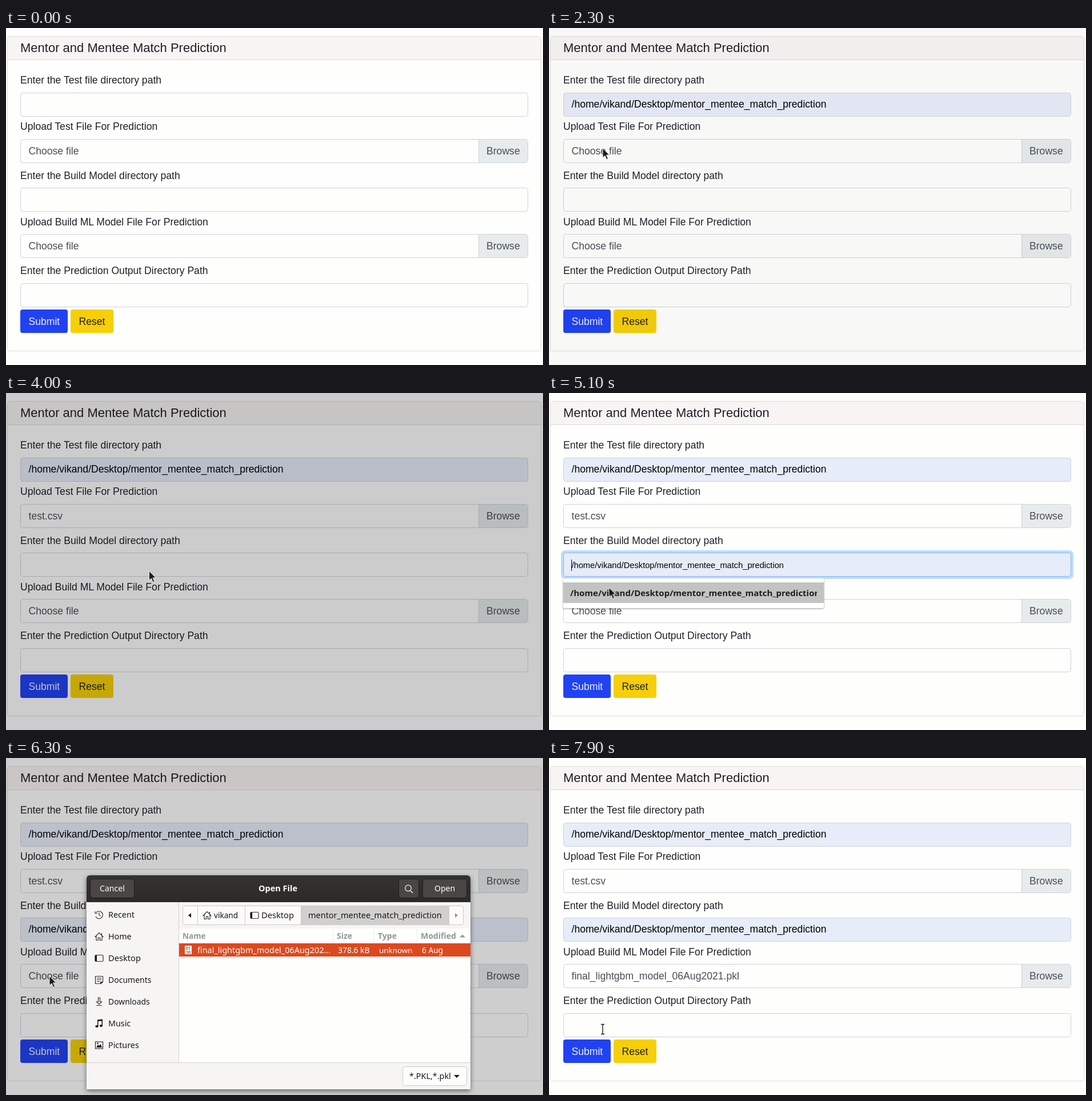
Write an HTML page that moves like this. It is 940 by 589 pixels and loops after 8000 ms.

```html
<!DOCTYPE html>
<html lang="en">
<head>
<meta charset="utf-8">
<title>Match prediction form</title>
<style>
  html, body { margin: 0; width: 100%; height: 100%; overflow: hidden; background: #fefefd; }
  svg { display: block; width: 940px; height: 589px; }
  text { white-space: pre; }
  .form { font: 17.6px "Liberation Sans", Arial, sans-serif; fill: #1d2027; }
  .form .soft { fill: #494f57; }
  .form .path { fill: #000; }
  .dlg, .popup { font: 14.3px "Noto Sans", "Open Sans", sans-serif; fill: #17191a; }
  .bold { font-weight: 700; }
  .head { font-weight: 700; font-size: 14px; fill: #939798; }
  .light { fill: #fff; }
  .line { fill: none; stroke: #2b2f31; stroke-width: 1.2; }
</style>
</head>
<body>
<svg id="stage" viewBox="0 0 940 589" xmlns="http://www.w3.org/2000/svg"></svg>
<script>
const LOOP = 8000, STEP = 100;
const USER = 'vikand';
const FOLDER = 'mentor_mentee_match_prediction';
const PATH = `/home/${USER}/Desktop/${FOLDER}`;

const label = (x, y, str, attrs = '') => `<text x="${x}" y="${y}" ${attrs}>${str}</text>`;
const size = px => `style="font-size:${px}px"`;
const rect = (x, y, w, h, fill, attrs = '') =>
  `<rect x="${x}" y="${y}" width="${w}" height="${h}" fill="${fill}" ${attrs}/>`;
// crisp one-pixel border covering x..x+w
const box = (x, y, w, h, fill, border, r = 4, attrs = '') =>
  rect(x + .5, y + .5, w - 1, h - 1, fill, `rx="${r}" stroke="${border}" ${attrs}`);
const vline = (x, y1, y2, color) => rect(x, y1, 1, y2 - y1, color);

// ---- page form ----
const textField = (id, y) => `
  <g id="${id}Focus">${rect(21, y - 4, 897, 50, '#bfdcfa', 'rx="7"')}</g>
  ${box(25, y, 889, 42, '#fefefd', '#ced4d8', 4, `id="${id}Box"`)}
  ${label(39.5, y + 26, PATH, `id="${id}Text" class="path"`)}
  <g id="${id}Preview">${label(39.5, y + 27, PATH, `class="path" ${size(14.67)}`)}</g>
  <g id="${id}Caret">${vline(39, y + 12, y + 32, '#000')}</g>`;

const fileField = (id, y) => `
  ${box(25, y, 889, 42, '#fefefd', '#ced4d8')}
  <path d="M828 ${y + 1}h82q3 0 3 3v34q0 3-3 3h-82z" fill="#e7ebec"/>
  ${vline(827, y + 1, y + 41, '#ced4d8')}
  ${label(39.5, y + 27, 'Choose file', `id="${id}" class="soft"`)}
  ${label(841, y + 27, 'Browse', 'class="soft"')}`;

const popup = (id, y) => `
  <g id="${id}Popup" class="popup">
    ${rect(25, y, 456, 52, '#fff', 'rx="2" filter="url(#popShadow)"')}
    <g id="${id}Hover">${rect(25, y + 7, 456, 36, '#c3c3c2')}</g>
    <svg x="25" y="${y}" width="444" height="52">${label(12, 31, PATH, `class="bold" fill="#1b1e20" ${size(15)}`)}</svg>
  </g>`;

const form = `
  <g class="form">
    ${box(2, 14, 935, 551, '#fefefd', '#dddddc')}
    <path d="M3 55V18q0-3 3-3h927q3 0 3 3v37z" fill="#f7f4f3"/>
    ${rect(3, 55, 933, 1, '#d9d9d9')}
    ${label(25, 42, 'Mentor and Mentee Match Prediction', size(22))}
    ${label(25, 97, 'Enter the Test file directory path')}
    ${textField('test', 113)}
    ${label(25, 178, 'Upload Test File For Prediction')}
    ${fileField('testFile', 194)}
    ${label(25, 264, 'Enter the Build Model directory path')}
    ${textField('model', 279)}
    ${label(25, 345, 'Upload Build ML Model File For Prediction')}
    ${fileField('modelFile', 360)}
    ${label(25, 430, 'Enter the Prediction Output Directory Path')}
    ${box(25, 446, 889, 42, '#fefefd', '#ced4d8')}
    ${rect(25, 492, 83, 41, '#2142f3', 'rx="4"')}
    ${label(39.5, 519, 'Submit', 'fill="#eef3fc"')}
    ${rect(113, 492, 75, 41, '#f6cf08', 'rx="4"')}
    ${label(127.5, 519, 'Reset')}
  </g>
  ${popup('test', 158)}
  ${popup('model', 324)}`;

// ---- file dialog ----
const ICONS = {
  Recent: '<path class="line" d="M-5-4A6.5 6.5 0 1 1-6 3M-7-6v3.5h3.5M0-4v4.5l3 1.5"/>',
  Home: '<path class="line" d="M-7.5 1L0-6.5 7.5 1M-5-1v7.5h3.5V2h3v4.5H5V-1M4.5-6v3"/>',
  Desktop: '<rect class="line" x="-7" y="-5.5" width="14" height="11" rx="1.5"/><path d="M-7-5h3V5h-3z"/>',
  Documents: '<path class="line" d="M-6.5-6.5h13v10l-3 3h-10zM-4-3.5h8M-4-.5h8M-4 2.5h5"/><path d="M2 6.5V3h4.5z"/>',
  Downloads: '<path class="line" d="M-1.5-7v7h-3L0 4.5 4.5 0h-3v-7zM-5 6.5H5"/>',
  Music: '<path d="M-3-6.5L6-7.5V4h-1.5v-8.5L-1.5-4V5H-3z"/><ellipse cx="-4" cy="5" rx="2.7" ry="2"/><ellipse cx="3.5" cy="4" rx="2.7" ry="2"/>',
  Pictures: '<rect class="line" x="-6.5" y="-6" width="13" height="12"/><path d="M-5 4L-2-1 0 1 2.5-2 5 4z"/><circle cx="-2.5" cy="-3" r="1.3"/>'
};
const icon = (name, x, y) => `<g transform="translate(${x} ${y})">${ICONS[name]}</g>`;
const placeSize = { Desktop: 14.66, Downloads: 13.9, Documents: 14 };
const places = Object.keys(ICONS).map((name, i) =>
  icon(name, 163, 274 + 38 * i) +
  label(179, 279 + 38 * i, name, size(placeSize[name] || 14.3))).join('');

const listing = (id, f) => `
  <g id="${id}">
    ${[f.sizeX - 7, f.typeX - 7].map(x => vline(x, 299, 323, '#ececeb')).join('')}
    ${label(f.sizeX, 316, 'Size', 'class="head"')}
    ${label(f.typeX, 316, 'Type', 'class="head"')}
    ${rect(303, 324, 510, 23, '#dc491f')}
    ${rect(313, 328, 12, 15, '#f8f4f1', 'rx="1"')}
    ${f.icon}
    <g class="light">
      ${label(335, 341, f.name, size(f.nameSize))}
      ${label(f.sizeX + 2, 341, f.bytes, size(13.9))}
      ${label(f.typeX + 2, 341, f.kind, size(13.4))}
      ${label(728, 341, f.date, size(13.7))}
    </g>
    ${box(f.filterX, 539, 807 - f.filterX, 34, '#fdfdfc', '#cdc8c3', 4)}
    ${label(f.filterX + 12, 561, f.filter, size(f.filterSize))}
    <path d="M784 554h10l-5 5z"/>
  </g>`;

const csv = listing('csvList', {
  sizeX: 618, typeX: 679, name: 'test.csv', nameSize: 14.7, bytes: '3.0 MB', kind: 'Text', date: '5 Aug',
  icon: '<path d="M315 332h8M315 335h8M315 338h5" stroke="#6a6260"/>',
  filterX: 695, filter: '*.CSV,*.csv', filterSize: 14
});
const pkl = listing('pklList', {
  sizeX: 579, typeX: 651, name: 'final_lightgbm_model_06Aug202...', nameSize: 14.43,
  bytes: '378.6 kB', kind: 'unknown', date: '6 Aug',
  icon: label(315, 335, '01', size(7)) + label(315, 342, '10', size(7)),
  filterX: 694, filter: '*.PKL,*.pkl', filterSize: 14.4
});

const dialog = `
  <g id="dialog" class="dlg">
    <path d="M141 579V211q0-6 6-6h660q6 0 6 6v368z" fill="#f7f5f4" filter="url(#dlgShadow)"/>
    <path d="M141 252V211q0-6 6-6h660q6 0 6 6v41z" fill="url(#bar)"/>
    ${box(147, 211, 78, 34, '#4a4645', '#1f1c1b', 5)}
    ${box(687, 211, 36, 34, '#4a4645', '#1f1c1b', 5)}
    ${box(729, 211, 78, 34, '#4a4645', '#1f1c1b', 5, 'id="openBtn"')}
    <g class="light">
      ${label(164, 233, 'Cancel', size(14.1))}
      ${label(442, 233, 'Open File', `class="bold" ${size(14.5)}`)}
      ${label(750, 233, 'Open', size(14))}
    </g>
    <path d="M708 232l4 4" stroke="#eee" stroke-width="1.6"/>
    <circle cx="704" cy="227.5" r="5.3" fill="none" stroke="#eee" stroke-width="1.2"/>
    ${vline(302, 252, 532, '#d4d0cc')}
    ${places}
    <g id="scroll">${rect(298, 255, 3, 214, '#a3a2a0', 'rx="1.5"')}</g>
    ${box(309, 258, 492, 34, '#fcfbfa', '#cdc8c3', 4)}
    ${rect(517, 259, 258, 32, '#d1d0cf')}
    ${[335, 418, 516, 775].map(x => vline(x, 259, 291, '#cdc8c3')).join('')}
    <path d="M324 271v8l-5-4z"/><path d="M786 271v8l5-4z" fill="#8e9192"/>
    ${icon('Home', 352, 275)}${label(364, 280, USER, size(13.6))}
    ${icon('Desktop', 435, 275)}${label(447, 280, 'Desktop', size(14.66))}
    ${label(529, 280, FOLDER, size(14.48))}
    ${rect(303, 298, 510, 234, '#fefefd')}
    ${rect(303, 323, 510, 1, '#ececeb')}
    ${vline(719, 299, 323, '#ececeb')}
    ${label(309, 316, 'Name', 'class="head" style="font-size:13.5px"')}
    ${label(726, 316, 'Modified', 'class="head"')}
    <path d="M794 313.5h10l-5-5z" fill="#939798"/>
    ${rect(141, 532, 672, 1, '#d4d0cc')}
    ${csv}${pkl}
  </g>`;

const cursor = `
  <path id="arrow" d="M0 0V16.5L3.8 13 6.8 19.6 9.4 18.4 6.5 12H11.6Z" fill="#1b1b1d" stroke="#f4f4f2" stroke-width=".9"/>
  <path id="ibeam" d="M-3-8.5H-1L0-7.5 1-8.5H3M0-7.5V7.5M-3 8.5H-1L0 7.5 1 8.5H3" fill="none" stroke="#111" stroke-width="1.3"/>`;

const stage = document.getElementById('stage');
stage.innerHTML = `
  <defs>
    <linearGradient id="bar" x2="0" y2="1"><stop stop-color="#363231"/><stop offset="1" stop-color="#2c2928"/></linearGradient>
    <filter id="popShadow" x="-5%" y="-20%" width="110%" height="150%"><feDropShadow dx="0" dy="1" stdDeviation="1.8" flood-opacity=".4"/></filter>
    <filter id="dlgShadow" x="-5%" y="-8%" width="110%" height="116%"><feDropShadow dx="0" dy="3" stdDeviation="4.5" flood-opacity=".5"/></filter>
  </defs>
  ${rect(0, 0, 940, 589, '#fefefd')}${form}
  ${rect(0, 0, 940, 589, '#000', 'id="shade"')}${dialog}${cursor}`;

// ---- timeline ----
const el = {};
stage.querySelectorAll('[id]').forEach(n => el[n.id] = n);
const show = (id, on) => el[id].style.display = on ? '' : 'none';

const fields = [
  { id: 'test', focus: 1100, popup: 1300, hover: 1500, pick: 1700, blur: 2200 },
  { id: 'model', focus: 4600, popup: 4700, hover: 5100, pick: 5300, blur: 5800 }
];
const dialogs = [
  { list: 'csvList', file: 'testFile', value: 'test.csv', open: 2300, press: 3600, close: 3900 },
  { list: 'pklList', file: 'modelFile', value: 'final_lightgbm_model_06Aug2021.pkl', open: 5900, press: 7200, close: 7400 }
];
// time, x, y, shape
const moves = [
  [300, 132, 23, 'arrow'], [600, 106, 95, 'arrow'], [700, 94, 118, 'ibeam'], [900, 74, 150, 'ibeam'],
  [1400, 74, 150, 'ibeam'], [1500, 96, 172, 'arrow'], [1700, 100, 178, 'arrow'], [2200, 94, 210, 'arrow'],
  [2800, 94, 210, 'arrow'], [3200, 749, 306, 'arrow'], [3300, 311, 331, 'arrow'], [3400, 331, 328, 'arrow'],
  [3800, 331, 328, 'arrow'], [4200, 170, 294, 'ibeam'], [4400, 135, 286, 'ibeam'], [4800, 135, 286, 'ibeam'],
  [4900, 138, 293, 'ibeam'], [5000, 138, 293, 'ibeam'], [5100, 105, 340, 'arrow'], [5300, 103, 346, 'arrow'],
  [5600, 78, 373, 'arrow'], [5700, 78, 373, 'arrow'], [5800, 76, 381, 'arrow'], [6300, 76, 381, 'arrow'],
  [6600, 397, 334, 'arrow'], [6700, 383, 333, 'arrow'], [6800, 392, 337, 'arrow'], [6900, 392, 337, 'arrow'],
  [7000, 386, 331, 'arrow'], [7300, 386, 331, 'arrow'], [7400, 382.5, 338.5, 'arrow'],
  [7800, 140, 452, 'ibeam'], [7900, 94, 474, 'ibeam']
];

function drawField(f, t) {
  const within = (a, b) => t >= a && t < b;
  const focused = within(f.focus, f.blur), preview = within(f.hover, f.pick), filled = t >= f.pick;
  show(f.id + 'Focus', focused);
  el[f.id + 'Focus'].setAttribute('opacity', Math.min(1, (t - f.focus + 50) / 150));
  show(f.id + 'Caret', within(f.focus, f.pick));
  show(f.id + 'Preview', preview);
  show(f.id + 'Text', filled);
  show(f.id + 'Popup', within(f.popup, f.pick));
  show(f.id + 'Hover', preview);
  el[f.id + 'Box'].setAttribute('fill', preview || filled ? '#e6ecf8' : '#fefefd');
  el[f.id + 'Box'].setAttribute('stroke', focused ? '#80b9f3' : '#ced4d8');
}

function drawDialogs(t) {
  let dim = 0, scale = 0;
  for (const d of dialogs) {
    el[d.file].textContent = t >= d.close ? d.value : 'Choose file';
    const active = t >= d.open && t < d.close + 500;
    show(d.list, active);
    if (!active) continue;
    const closing = t >= d.close, age = t - (closing ? d.close : d.open);
    // the page darkens at half the speed it brightens again
    dim = closing ? Math.max(0, .9 - age / 375) : Math.min(1, .08 + age / 750);
    // the window unfolds with ease-out over 150 ms and folds in one step
    scale = closing ? (age < STEP ? .436 : 0) : 1 - (1 - Math.min(1, age / 150)) ** 2;
    show('scroll', t >= d.open + 700);
    const pressed = t >= d.press;
    el.openBtn.setAttribute('fill', pressed ? '#1d1b1b' : '#4a4645');
    el.openBtn.setAttribute('stroke', pressed ? '#0c0b0b' : '#1f1c1b');
    el.dialog.setAttribute('opacity', closing ? 1 : scale);
  }
  el.shade.setAttribute('opacity', .31 * dim);
  show('dialog', scale > 0);
  el.dialog.setAttribute('transform', scale === 1 ? '' : `translate(0 ${393.5 * (1 - scale)}) scale(1 ${scale})`);
}

function drawCursor(t) {
  const i = moves.findLastIndex(m => m[0] <= t);
  const a = moves[i], b = moves[i + 1] || a;
  show('arrow', a && a[3] === 'arrow');
  show('ibeam', a && a[3] === 'ibeam');
  if (!a) return;
  const p = b === a ? 0 : (t - a[0]) / (b[0] - a[0]);
  el[a[3]].setAttribute('transform', `translate(${a[1] + (b[1] - a[1]) * p} ${a[2] + (b[2] - a[2]) * p})`);
}

function draw(now) {
  const t = Math.floor((now % LOOP) / STEP) * STEP;
  fields.forEach(f => drawField(f, t));
  drawDialogs(t);
  drawCursor(t);
}

const start = performance.now();
function tick() {
  draw(performance.now() - start);
  requestAnimationFrame(tick);
}
tick();
</script>
</body>
</html>
```
